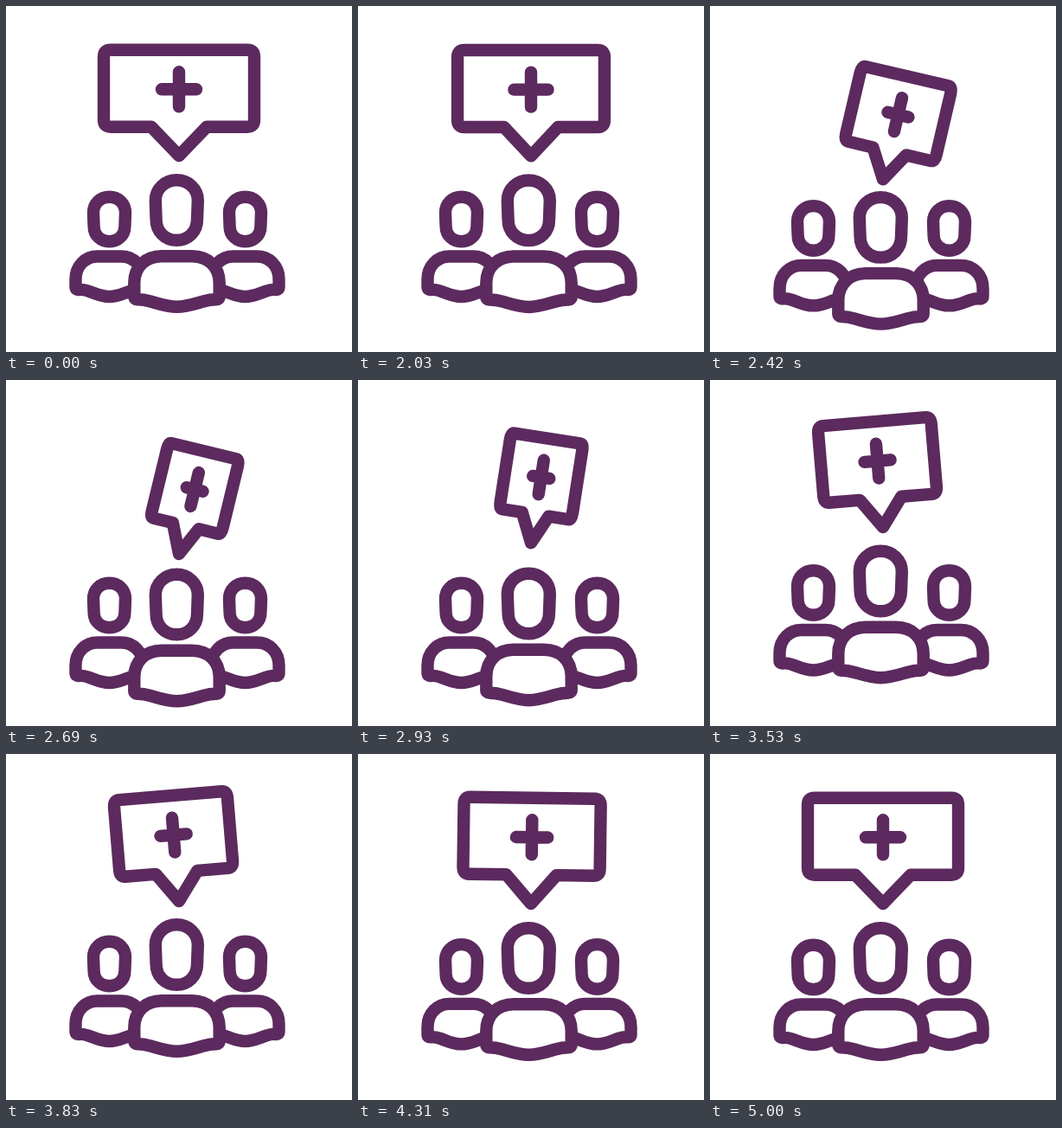
Write an HTML page without scripts that moves like this. It is 400 by 400 pixels and loops after 5120 ms.

```html
<!DOCTYPE html>
<html lang="en">
<head>
<meta charset="utf-8">
<title>Group health talk</title>
<style>
  html, body { margin: 0; width: 100%; height: 100%; overflow: hidden; background: #fff; }
  svg { display: block; width: 100vw; height: 100vh; }
  path {
    fill: #fff; stroke: #5c2a5e; stroke-width: 14.4;
    stroke-linecap: round; stroke-linejoin: round;
    vector-effect: non-scaling-stroke;
  }

  .bubble, .lead, .side {
    animation: 5120ms cubic-bezier(.333, 0, .667, 1) infinite;
  }
  .lead { animation-name: lead; }
  .side { animation-name: side; }
  .bubble { transform-origin: 200px 173px; animation-name: drop, tilt, squeeze; }

  @keyframes lead {
    0%, 39.06% { translate: 0 0; }
    50%, 55.47% { translate: 0 23.5px; }
    70.12%, 75.39% { translate: 0 -4px; }
    83.98%, 100% { translate: 0 0; }
  }
  @keyframes side {
    0%, 40.23% { translate: 0 0; }
    50.78%, 58.87% { translate: 0 14px; }
    72.93%, 77.73% { translate: 0 -4px; }
    86.33%, 100% { translate: 0 0; }
  }
  @keyframes drop {
    0%, 39.06% { translate: 0 0; }
    48.44%, 51.66% { translate: 0 28.5px; }
    64.16%, 74.22% { translate: 0 -3px; }
    83.98%, 100% { translate: 0 0; }
  }
  @keyframes tilt {
    0%, 39.65% { rotate: 0deg; }
    48.63%, 51.17% { rotate: 14deg; }
    68.75%, 74.22% { rotate: -4.8deg; }
    87.89% { rotate: 2deg; }
    97.66%, 100% { rotate: 0deg; }
  }
  @keyframes squeeze {
    0%, 39.64% { scale: 1 1; }
    39.65% { scale: .977 1; animation-timing-function: linear; }
    47.27% { scale: .617 1; animation-timing-function: ease-out; }
    52.73%, 56.64% { scale: .483 1; }
    69.53%, 74.8% { scale: .755 1; }
    90.82%, 100% { scale: 1 1; }
  }
</style>
</head>
<body>
<svg viewBox="0 0 400 400">
  <defs>
    <g id="friend">
      <path d="M119.5 220.7C130 220.7 138 228.5 138 239L137.4 255C137.4 265 129.5 272.3 119.5 272.3S101.6 265 101.6 255L101 239C101 228.5 109 220.7 119.5 220.7Z"/>
      <path d="M106 289.5H133C147 289.5 158.5 300 158.5 316V325Q158.5 328.3 155 328Q150 327.5 144 329.5C134 333 129 336 119.5 336S105 333 95 329.5Q89 327.5 84 328Q80.5 328.3 80.5 325V316C80.5 300 92 289.5 106 289.5Z"/>
    </g>
  </defs>

  <g class="side">
    <use href="#friend"/>
    <use href="#friend" x="157"/>
  </g>

  <g class="lead">
    <path d="M197.3 201.3C211 201.3 221.8 211.5 221.8 225L221 247C221 260.5 211 270.8 197.3 270.8S173.6 260.5 173.6 247L172.8 225C172.8 211.5 183.6 201.3 197.3 201.3Z"/>
    <path d="M180 289.3H215C234 289.3 246.7 302 246.7 320V336Q246.7 339 243 339.3Q236 339.3 228 341.5C216 345 208 347.8 197.5 347.8S179 345 167 341.5Q159 339.3 152 339.3Q148.3 339 148.3 336V320C148.3 302 161 289.3 180 289.3Z"/>
  </g>

  <g class="bubble">
    <path d="M121 50.7H279Q287 50.7 287 58.7V131.7Q287 139.7 279 139.7H232L200 173L168 139.7H121Q113 139.7 113 131.7V58.7Q113 50.7 121 50.7Z"/>
    <path d="M180 96.3H220M200 76.3V116.3"/>
  </g>
</svg>
</body>
</html>
```
